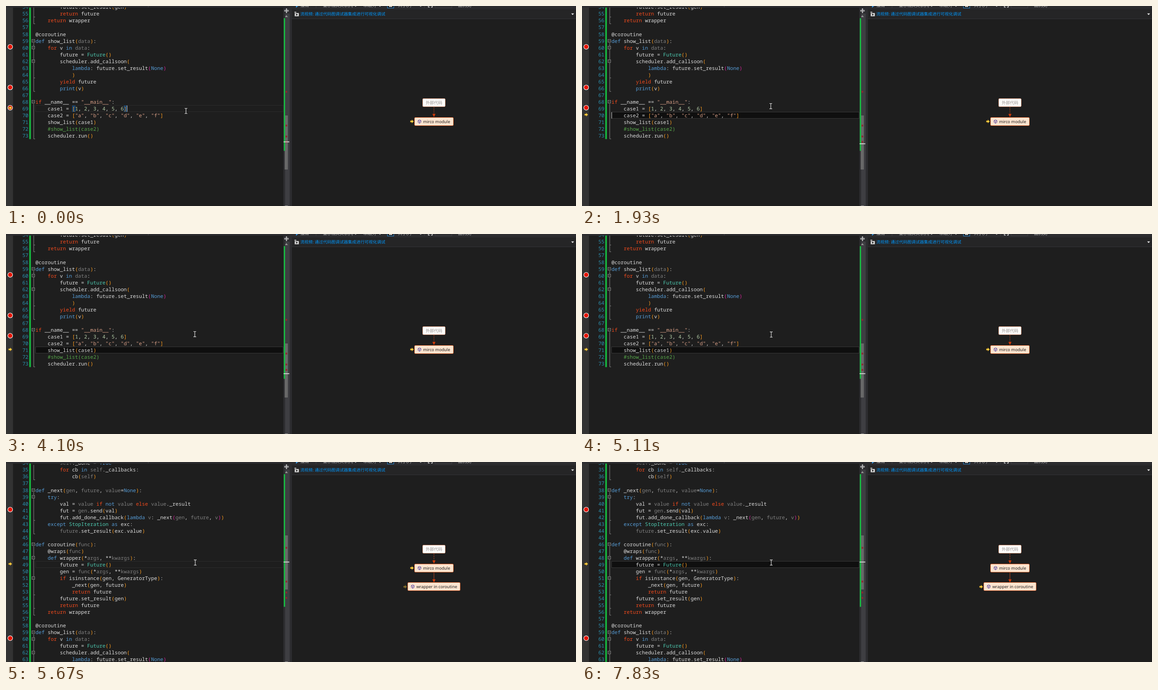
Animation of 1262x444 px, one loop 8000 ms. Source, as an HTML page:

```html
<!DOCTYPE html>
<html lang="zh">
<head>
<meta charset="utf-8">
<title>Debugger stepping</title>
<style>
html, body { margin: 0; width: 100%; height: 100%; overflow: hidden; background: #1e1e1e; }
svg { display: block; width: 1262px; height: 444px; }
text { white-space: pre; text-rendering: geometricPrecision; }
.code { font: 11.23px "Noto Sans Mono", "DejaVu Sans Mono", monospace; }
.ui { font: 9.2px "Noto Sans", "Noto Sans CJK SC", "Noto Sans CJK", sans-serif; }
.cjk { font: 500 9.2px "Noto Sans CJK SC", "Noto Sans CJK", "Noto Sans", sans-serif; }
</style>
</head>
<body>
<svg id="stage" viewBox="0 0 1262 444"></svg>
<script>
const SOURCE = `        self._done = True
        for cb in self._callbacks:
            cb(self)

def _next(gen, future, value=None):
    try:
        val = value if not value else value._result
        fut = gen.send(val)
        fut.add_done_callback(lambda v: _next(gen, future, v))
    except StopIteration as exc:
        future.set_result(exc.value)

def coroutine(func):
    @wraps(func)
    def wrapper(*args, **kwargs):
        future = Future()
        gen = func(*args, **kwargs)
        if isinstance(gen, GeneratorType):
            _next(gen, future)
            return future
        future.set_result(gen)
        return future
    return wrapper

@coroutine
def show_list(data):
    for v in data:
        future = Future()
        scheduler.add_callsoon(
            lambda: future.set_result(None)
            )
        yield future
        print(v)

if __name__ == "__main__":
    case1 = [1, 2, 3, 4, 5, 6]
    case2 = ["a", "b", "c", "d", "e", "f"]
    show_list(case1)
    #show_list(case2)
    scheduler.run()`.split("\n");

const FIRST = 34, PITCH = 15.03, CHAR = 6.738, LEFT = 65.3;
const svg = document.getElementById("stage");

function add(parent, tag, attrs = {}, content) {
  const el = document.createElementNS("http://www.w3.org/2000/svg", tag);
  for (const key in attrs) el.setAttribute(key, attrs[key]);
  if (content !== undefined) el.textContent = content;
  return parent.appendChild(el);
}
const group = (parent, attrs) => add(parent, "g", attrs);
const rect = (parent, x, y, width, height, fill, more) =>
  add(parent, "rect", { x, y, width, height, fill, ...more });
const path = (parent, d, fill, more) => add(parent, "path", { d, fill, ...more });
const label = (parent, x, y, fill, content, cls = "ui") =>
  add(parent, "text", { x, y, fill, class: cls }, content);
const show = (el, on) => el.setAttribute("opacity", Number(on));
const move = (el, x, y) => el.setAttribute("transform", `translate(${x} ${y})`);
const lineY = line => 2.4 + (line - FIRST) * PITCH;

// Editor
rect(svg, 0, 0, 15.5, 444, "#333333");
const highlight = rect(svg, 65.5, 0, 548, 14, "none", { "stroke-width": 1 });
const brackets = group(svg);
for (const x of [147, 261.5])
  rect(brackets, x, 221.5, 6.3, 13, "#0e3a68", { stroke: "#1d5c96", "stroke-width": 0.7 });
const doc = group(svg);

function tokenColor(token, line, before, depth) {
  if (token[0] === "#") return "#57a64a";
  if (token[0] === '"') return "#d69d85";
  if (/^\d/.test(token)) return "#b5cea8";
  if (/^[()[\]]$/.test(token)) return depth > 1 ? "#d8249c" : "#ff9d1e";
  if (/^(return|for|if|else|yield)$/.test(token)) return "#f04a1d";
  if (/^(def|in|lambda|print|None|True|try|except|as|not)$/.test(token)) return "#569cd6";
  if (/^(Future|StopIteration)$/.test(token)) return "#4ec9b0";
  const params = line < 46 ? /^(gen|future|value|v|self)$/ : /^(data|func|args|kwargs)$/;
  return params.test(token) && before !== "." ? "#7f7f7f" : "#dcdcdc";
}

let depth = 0;
SOURCE.forEach((source, i) => {
  const line = FIRST + i, y = lineY(line) + 4;
  add(doc, "text", { x: 49.6, y, fill: "#2b91af", class: "code", "text-anchor": "end" }, line);
  for (const match of source.matchAll(/#.*|"[^"]*"|\w+|[()[\]]|[^\w\s()[\]"#]+/g)) {
    const token = match[0];
    if (/^[([]$/.test(token)) depth++;
    const fill = tokenColor(token, line, source[match.index - 1], depth);
    if (/^[)\]]$/.test(token)) depth--;
    label(doc, LEFT + match.index * CHAR, y, fill, token, "code");
  }
});
rect(doc, 51.5, -10, 3.6, lineY(73) + 17.5, "#17b840");

const settledFolds = group(doc), lateFolds = group(doc);
const foldLayer = line => line > 37 && line < 45 ? lateFolds : settledFolds;
const foldStroke = { stroke: "#a5a5a5", "stroke-width": 0.8 };
for (const [from, to] of [[34, 36], [38, 44], [46, 56], [59, 66], [68, 73]])
  path(foldLayer(from), `M61.4 ${lineY(from) + 4}V${lineY(to) + 7}`, "none", foldStroke);
for (const line of [36, 42, 44, 53, 55, 56, 64, 66, 73])
  path(foldLayer(line), `M61.4 ${lineY(line) + 7}h3`, "none", foldStroke);
for (const line of [38, 39, 46, 48, 51, 59, 60, 62, 68]) {
  const y = lineY(line), layer = line < 59 ? lateFolds : settledFolds;
  rect(layer, 57.5, y - 3.3, 6, 6, "#1e1e1e", foldStroke);
  path(layer, `M59 ${y - 0.3}h3`, "none", foldStroke);
}
for (const line of [41, 60, 66, 69])
  add(doc, "circle", { cx: 9.3, cy: lineY(line) - 2, r: 5.3, fill: "#e51400", stroke: "#ffffff", "stroke-width": 1.1 });

const ARROW = "M-3.6 -1.7h3.4v-2.3L4 0L-.2 4v-2.3h-3.4z";
const pointer = (parent, x, y) => {
  const el = path(parent, ARROW, "#fcd043", { stroke: "#8a6518", "stroke-width": 0.6 });
  move(el, x, y);
  return el;
};
const lineArrow = pointer(svg, 9.3, 0);
const caret = rect(svg, 0, 0, 1, 14, "#dcdcdc");

// Scroll bar with change and breakpoint marks
rect(svg, 614, 4, 14, 440, "#3e3e42");
rect(svg, 614, 4, 4, 440, "#2d2d30");
const thumb = rect(svg, 617, 0, 7, 120, "#686868");
rect(svg, 615, 27, 3, 294.5, "#17b840");
for (const y of [188.5, 263.5, 287.7, 299.7]) rect(svg, 619, y, 3.6, 4, "#8c2a30");
const caretMark = rect(svg, 614.5, 0, 12.8, 1.6, "#e6e6e6");
rect(svg, 614, 4, 14, 13, "#2d2d30");
path(svg, "M616 9.5h10M616 11.5h10M621 5.5v10", "none", { stroke: "#e8e8e8", "stroke-width": 1 });
path(svg, "M619 7.6l2-2.4 2 2.4zM619 13.4l2 2.4 2-2.4z", "#e8e8e8");
path(svg, "M617.5 24.5l3.3-4 3.3 4z", "#999999");
rect(svg, 617.5, 443, 6.5, 1, "#999999");

// Right panel
rect(svg, 628, 0, 5, 444, "#2d2d30");
rect(svg, 633, 4, 629, 440, "#1e1e1e");
const progress = group(svg);
rect(progress, 633, 6, 629, 23, "#252526");
label(progress, 639.5, 21.7, "#0097fb", "取消", "cjk");
label(progress, 661, 21.7, "#f1f1f1", "正在绘制当前调用堆栈图. 正在解析调用堆栈.", "cjk");
const info = group(svg);
rect(info, 633, 6, 629, 23, "#252526");
for (const y of [6.5, 28.5]) path(info, `M633 ${y}h629`, "none", { stroke: "#333337", "stroke-width": 1 });
rect(info, 639.2, 15.6, 9.2, 7.2, "#d8d8d8");
path(info, "M638.6 14.6v-1.8h4v1.8z", "#d8d8d8");
path(info, "M642.3 16.8l4 2.4-4 2.4z", "#1e1e1e");
label(info, 651.4, 21.3, "#0097fb", "流视频: 通过代码图调试器集成进行可视化调试", "cjk");
path(info, "M1251.3 16.6h6.4l-3.2 3.4z", "#f1f1f1");

// Clipped toolbars along the top edge
rect(svg, 0, 0, 628, 3.5, "#2d2d30");
rect(svg, 314.5, 0, 1, 3, "#46464a");
rect(svg, 633, 0, 629, 5.5, "#2d2d30");
path(svg, "M642 0h5l-5 4z", "#3a96dd");
for (const [x, word] of [[652, "撤消"], [702, "显示相关关系(A)"], [790, "布局(Y)"], [868, "大小(F)"], [1001, "图例(L)"]])
  label(svg, x, 2, "#d4d4d4", word, "cjk");
for (const x of [774, 828, 918]) path(svg, `M${x - 2} 0h4l-2 1.8z`, "#c8c8c8");
for (const x of [686, 926]) rect(svg, x, 0, 0.8, 4, "#46464a");
rect(svg, 844.5, -4, 14, 8.5, "#1e1e1e", { stroke: "#2d8fdc", "stroke-width": 1 });
rect(svg, 848, 0, 7, 2, "#d4d4d4");
path(svg, "M935 0v2.5h3M944 0v2.5h-3", "none", { stroke: "#d4d4d4", "stroke-width": 1.4 });
rect(svg, 950, -4, 37, 8, "#2d2d30", { stroke: "#434346", "stroke-width": 1 });

// Call graph
const graph = group(svg);
function node(parent, x, y, width, title) {
  rect(parent, x + 0.5, y + 0.5, width - 1, 18, "#fde5d0", { rx: 2, stroke: "#e2662f", "stroke-width": 1 });
  path(parent, `M${x + 11.5} ${y + 5.6}l3.2 1.7v4l-3.2 2-3.2-2v-4zM${x + 8.3} ${y + 7.3}l3.2 1.8 3.2-1.8M${x + 11.5} ${y + 9.1}v4.2`,
    "none", { stroke: "#4d3c9c", "stroke-width": 1 });
  label(parent, x + 19.4, y + 12.8, "#1e1e1e", title);
}
function link(parent, y, dash) {
  path(parent, `M947.5 ${y}v15.5`, "none", { stroke: "#b5411c", "stroke-width": 1, "stroke-dasharray": dash });
  path(parent, `M944 ${y + 15}h7l-3.5 7z`, "#d03a08");
}
link(graph, 224.5, "3 1.6");
rect(graph, 922.5, 205.5, 50, 18, "#fffdfb", { rx: 2, stroke: "#e08a62", "stroke-width": 1, "stroke-dasharray": "3 1" });
label(graph, 929.2, 218, "#959190", "外部代码", "cjk");
node(graph, 904, 247, 87, "mirco module");
const oldArrow = pointer(graph, 898.7, 256.3);
const callee = group(graph);
link(callee, 266.5, "none");
node(callee, 889, 288, 117, "wrapper in coroutine");
const newArrow = pointer(callee, 883.6, 298);

const mouse = path(svg, "M-3 -5.8h2.2l.8 .7 .8-.7h2.2M0 -5v10M-3 5.8h2.2l.8-.7 .8 .7h2.2", "none",
  { stroke: "#f0f0f0", "stroke-width": 1.1 });

// Each step changes part of the state at its time in ms
const STEPS = [
  [0, { top: 54, row: 69, focus: 0, caret: 1, caretX: 267.5, mark: 301.5, match: 1, mouse: [398.5, 233],
        busy: 0, called: 0, folded: 0, oldArrow: 1, newArrow: 0 }],
  [300, { caret: 0, mouse: [404, 230.5] }],
  [420, { mouse: [411, 227] }],
  [540, { mouse: [416, 224] }],
  [820, { row: 70, caretX: 65.3, mark: 305.7, match: 0, mouse: [418, 222.3] }],
  [940, { focus: 1, caret: 1 }],
  [1470, { caret: 0 }],
  [1930, { caret: 1 }],
  [2490, { caret: 0 }],
  [2610, { row: 71, mark: 310, focus: 0 }],
  [2740, { focus: 1, caret: 1 }],
  [3010, { caret: 0 }],
  [3540, { caret: 1 }],
  [4100, { caret: 0 }],
  [4220, { mouse: [418.5, 222.3] }],
  [4370, { mouse: [419, 223.2] }],
  [4680, { caret: 1 }],
  [5110, { caret: 0 }],
  [5520, { top: 34, row: 49, focus: 0, caret: 1, mark: 222, busy: 1 }],
  [5670, { caret: 0, busy: 0, called: 1, folded: 1, newArrow: 0.45 }],
  [5790, { newArrow: 1, oldArrow: 0.5 }],
  [6190, { focus: 1, caret: 1, oldArrow: 0 }],
  [6710, { caret: 0 }],
  [7240, { caret: 1 }],
  [7830, { caret: 0 }]
];

function render(time) {
  const s = Object.assign({}, ...STEPS.filter(step => step[0] <= time).map(step => step[1]));
  const rowY = Math.round(lineY(s.row) - lineY(s.top) + 2.4);
  move(doc, 0, lineY(FIRST) - lineY(s.top));
  highlight.setAttribute("y", rowY - 7.5);
  highlight.setAttribute("fill", s.focus ? "#0f0f0f" : "#1e1e1e");
  highlight.setAttribute("stroke", s.focus ? "#383838" : "#2b2b2b");
  move(lineArrow, 9.3, rowY - 1.8);
  move(caret, s.caretX, rowY - 7.2);
  show(caret, s.caret);
  show(brackets, s.match);
  show(lateFolds, s.folded);
  thumb.setAttribute("y", s.top === 54 ? 243 : 163);
  caretMark.setAttribute("y", s.mark - 0.7);
  show(progress, s.busy);
  move(info, 0, s.busy * 22);
  move(graph, 0, s.called * -21);
  show(callee, s.called);
  show(oldArrow, s.oldArrow);
  show(newArrow, s.newArrow);
  move(mouse, ...s.mouse);
}

const start = performance.now();
function tick() {
  render((performance.now() - start) % 8000);
  requestAnimationFrame(tick);
}
tick();
</script>
</body>
</html>
```
